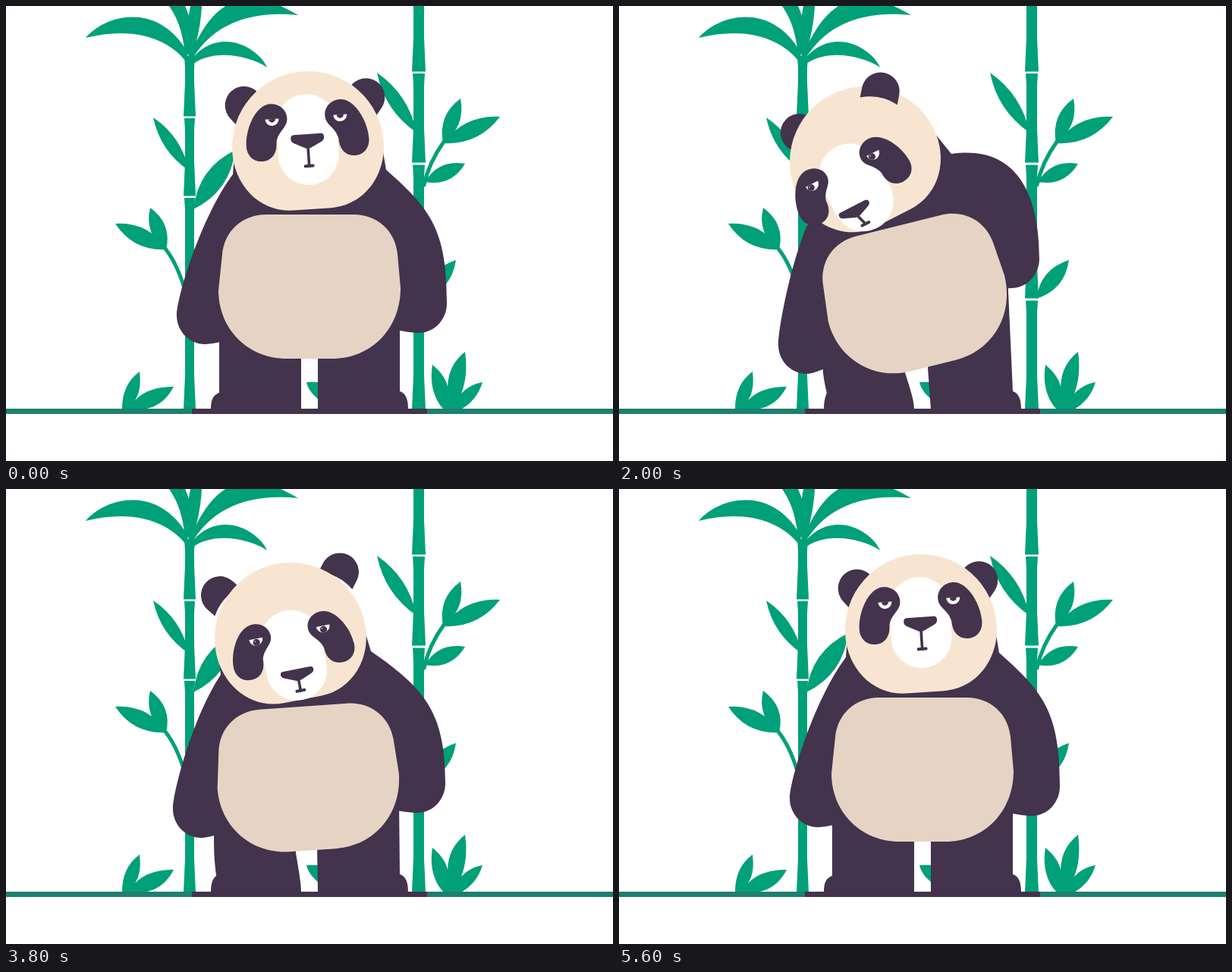
Animation of 800x600 px, one loop 5640 ms. Source, as an HTML page with a canvas:

```html
<!DOCTYPE html>
<html lang="en">
<head>
<meta charset="utf-8">
<title>Panda</title>
<style>
html, body { margin: 0; width: 100%; height: 100%; overflow: hidden; background: #fff; }
canvas { display: block; }
</style>
</head>
<body>
<canvas id="stage" width="800" height="600"></canvas>
<script>
const ctx = document.getElementById('stage').getContext('2d');
const LOOP = 5640, STEP = 40;
const GREEN = '#00a078', GROUND = '#1f7f70', DARK = '#43334c';
const CREAM = '#f8e5d1', BELLY = '#e5d4c4', WHITE = '#fff';

// head x, y, angle | face shift x, y | ear spread | pupil x, y | belly x, y, angle |
// left neck | left arm side | right neck | right shoulder | right arm side | left hip
const rest  = [398,186,-3.8,    0,0,    80.5,  0,0,   400,370,0,      299,222, 225,408, 501,216, 560,268, 581,392,   0];
const lean  = [350,185,-23.5,  10,32,   67,   -5,4.5, 394,370.5,-10,  262,258, 214,436, 459,198, 535,240, 560,375,  -7];
const slump = [325,206,-27,   -26,32,   60,   -3,4,   391,382,-14,    252,280, 210,447, 438,195, 530,182, 554,333, -13];
const gaze  = [328,200,-28,     0,32,   80.5,  3,5,   391,378.5,-14,  248,275, 209,447, 439,193, 530,186, 552,339, -12];
const rise  = [375,197,-11,     0,30.5, 80.5,  0,5,   398,381.5,-4,   283,245, 220,422, 481,214, 550,262, 579,388,  -7];
const tilt  = [404,190,10.5,    0,3,    80.5,  0,0,   400,374,-.5,    297,228, 225,410, 500,218, 560,268, 582,393,  -2];

const keys = [
  [0, rest], [480, rest], [1320, lean], [2000, slump], [2440, gaze], [3280, gaze],
  [3800, rise], [4320, tilt], [5000, rest], [LOOP, rest]
];

const slope = (k, i) => (keys[k + 1][1][i] - keys[k][1][i]) / (keys[k + 1][0] - keys[k][0]);

// Tangent that never overshoots: flat at holds and turning points.
function tangent(k, i) {
  if (k === 0 || k === keys.length - 1) return 0;
  const a = slope(k - 1, i), b = slope(k, i);
  return a * b <= 0 ? 0 : 2 * a * b / (a + b);
}

function poseAt(t) {
  let k = 0;
  while (k < keys.length - 2 && t >= keys[k + 1][0]) k++;
  const [t0, from] = keys[k], [t1, to] = keys[k + 1];
  const d = t1 - t0, u = (t - t0) / d, v = 1 - u;
  return from.map((a, i) =>
    a * (1 + 2 * u) * v * v + to[i] * u * u * (3 - 2 * u) +
    d * u * v * (tangent(k, i) * v - tangent(k + 1, i) * u));
}

function fill(path, color) {
  ctx.fillStyle = color;
  ctx.fill(new Path2D(path));
}

function line(path, color, width) {
  ctx.strokeStyle = color;
  ctx.lineWidth = width;
  ctx.lineCap = 'round';
  ctx.stroke(new Path2D(path));
}

function disc(x, y, r, color) {
  ctx.fillStyle = color;
  ctx.beginPath();
  ctx.arc(x, y, r, 0, Math.PI * 2);
  ctx.fill();
}

function place(x, y, angle, draw, flip = 1, squash = 1) {
  ctx.save();
  ctx.translate(x, y);
  ctx.scale(flip, squash);
  ctx.rotate(angle * Math.PI / 180);
  draw();
  ctx.restore();
}

function leaf(x1, y1, x2, y2, w) {
  const len = Math.hypot(x2 - x1, y2 - y1);
  const nx = -(y2 - y1) / len * w, ny = (x2 - x1) / len * w;
  const mx = (x1 + x2) / 2, my = (y1 + y2) / 2;
  fill(`M${x1},${y1}Q${mx + nx},${my + ny} ${x2},${y2}Q${mx - nx},${my - ny} ${x1},${y1}Z`, GREEN);
}

function cane(x, top, bottom, w) {
  const n = w - 2, flare = bottom - 45;
  fill(`M${x - w + 1},${top}H${x + w - 1}L${x + n},${top + 16}V${flare}` +
    `L${x + w},${bottom}H${x - w}L${x - n},${flare}V${top + 16}Z`, GREEN);
}

function drawPlants() {
  cane(242, 66, 145.5, 8);
  cane(242, 148, 250.5, 8);
  cane(242, 253, 532, 8);
  cane(544, -80, 86.5, 9);
  cane(544, 89, 206.5, 9);
  cane(544, 209.5, 385.5, 9);
  cane(544, 388.5, 532, 9);

  // crown
  fill('M105,42C130,12 200,-8 240,62L238,74C210,38 160,28 105,42Z', GREEN);
  fill('M385,12C350,-8 290,-40 247,55L243,74C270,25 320,5 385,12Z', GREEN);
  fill('M344,81C335,58 285,25 246,68L242,80C270,55 320,65 344,81Z', GREEN);
  fill('M215,0C225,15 232,30 236,62L248,64C249,40 243,15 236,0Z', GREEN);
  fill('M243,0C239,20 237,45 242,76C250,55 257,25 258,0Z', GREEN);

  // left cane
  leaf(194, 147, 241, 217, 17);
  leaf(302, 190, 247, 268, 26);
  leaf(144, 287, 212, 321, 22);
  leaf(190, 266, 211, 322, 20);
  line('M210,320Q225,339 235,372', GREEN, 5);

  // right cane
  leaf(489, 88, 541, 167, 19);
  leaf(599, 122, 576, 181, 20);
  leaf(651, 146, 576, 181, 22);
  leaf(605, 208, 552, 232, 20);
  line('M577,179Q557,207 551,236', GREEN, 5);
  leaf(593, 335, 550, 386, 21);

  // ground tufts
  fill('M153,532C153,510 160,494 176,482C178,500 176,510 170,520' +
    'C182,507 200,502 221,502C212,520 196,532 176,532Z', GREEN);
  fill('M577,532C564,518 558,498 562,473C573,482 580,492 582,502C583,482 590,468 605,456' +
    'C608,478 606,496 600,511C608,503 617,498 628,496C623,513 613,524 600,532Z', GREEN);
  fill('M396,496H430V530Q400,515 396,496Z', GREEN);
  ctx.fillStyle = GROUND;
  ctx.fillRect(0, 531, 800, 7);
}

function drawBody(p) {
  const [hx, hy, hr] = p;
  const [bx, by, br, lnx, lny, lex, ley, rnx, rny, rcx, rcy, rex, rey, hip] = p.slice(8);
  const nx = 97 * Math.cos(hr * Math.PI / 180), ny = 97 * Math.sin(hr * Math.PI / 180);
  const lb = ley + 38, rb = rey + 39, right = (bx - 400) * .75;

  fill(`M${lnx},${lny}` +
    `C${lnx + (lex - lnx) * .58},${lny + (ley - lny) * .31} ${lex},${ley - 23} ${lex},${ley}` +
    `C${lex},${ley + 21} ${lex + 17},${lb} ${lex + 37},${lb}Q${lex + 65},${lb} 400,400` +
    `Q${rex - 64},${rb} ${rex - 37},${rb}C${rex - 16},${rb} ${rex},${rey + 21} ${rex},${rey}` +
    `C${rex},${rey - (rey - rny) * .55} ${rcx},${rcy} ${rnx},${rny}` +
    `L${hx + nx},${hy + ny}L${hx - nx},${hy - ny}Z`, DARK);

  fill(`M${281 + hip},425V460C${281 + hip},485 ${281 + hip * .8},495 ${281 + hip * .55},510` +
    `C273,513 270,519 270,532H389C389,518 ${389 + hip * .6},498 ${389 + hip},480V425Z`, DARK);
  fill(`M${519 + right},360L519,508C527,511 530,518 530,532H411L${411 + right},440V360Z`, DARK);
  ctx.fillStyle = DARK;
  ctx.fillRect(245, 531, 310, 7);

  place(bx, by, br, () => fill(
    'M-57,-95H58C90,-95 113,-73 116,-43L120,2C120,55 82,95 30,95H-30' +
    'C-82,95 -120,55 -120,5L-115,-43C-112,-73 -89,-95 -57,-95Z', BELLY));
}

function drawEye(x, y, px, py) {
  place(x, y, 0, () => {
    ctx.beginPath();
    ctx.arc(0, 0, 9, 0, Math.PI);
    ctx.closePath();
    ctx.fillStyle = WHITE;
    ctx.fill();
    ctx.clip();
    disc(px, py, 4.6, DARK);
    disc(px - 1.6, py - 1.6, .7, WHITE);
  });
}

function drawHead(p, t) {
  const [hx, hy, hr, fx, fy, spread, px, py] = p;
  const patch = 'M-46,-60C-34,-60 -25,-51 -25,-40C-25,-27 -38,-24 -41,-9' +
    'C-41,6 -49,15 -61,15C-74,15 -81,5 -81,-6C-81,-28 -66,-60 -46,-60Z';
  const ear = side => place(side * spread, -60.5 - fy * .43, 38, () =>
    fill('M-25,13V0A25,25 0 0 1 25,0V13Q0,3 -25,13Z', DARK), side);
  const inFront = side => t > 1000 && t < (side < 0 ? 1960 : 2160);
  const sides = [-1, 1];

  place(hx, hy, hr, () => {
    sides.filter(s => !inFront(s)).forEach(ear);
    fill('M-100,0A100,100 0 0 1 100,0C100,45 68,82 25,82H-25C-68,82 -100,45 -100,0Z', CREAM);
    place(fx, fy * 1.07, 0, () =>
      fill('M-40,-30A40,40 0 0 1 40,-30V10A40,40 0 0 1 -40,10Z', WHITE));
    sides.forEach(s =>
      place(fx * 1.1, fy * .97, 0, () => fill(patch, DARK), -s, 1 - fy * .0016));
    sides.forEach(s => drawEye(s * 45 + fx * 1.2, -40 + fy * 1.04, px, py));

    // The nose shortens and drops as the face turns down.
    const noseX = fx * 1.6, noseY = fy * 1.81, mouthX = fx * 1.42, mouthY = 25 + fy * 1.48;
    place(noseX, noseY, 0, () => fill(
      'M-18,-17H18Q22,-17 22,-12Q22,-8 18,-6L4,1Q0,3 -4,1L-18,-6Q-22,-8 -22,-12Q-22,-17 -18,-17Z', DARK),
      1, 1 - fy * .006);
    line(`M${noseX},${noseY}L${mouthX},${mouthY}`, DARK, 3.6);
    line(`M${mouthX - 5},${mouthY}h10`, DARK, 4);
    sides.filter(inFront).forEach(ear);
  });
}

function frame(now) {
  const t = Math.floor((now % LOOP) / STEP) * STEP;
  const pose = poseAt(t);
  ctx.fillStyle = WHITE;
  ctx.fillRect(0, 0, 800, 600);
  drawPlants();
  drawBody(pose);
  drawHead(pose, t);
}

let start;
function tick() {
  const now = performance.now();
  start ??= now;
  frame(now - start);
  requestAnimationFrame(tick);
}
tick();
</script>
</body>
</html>
```
